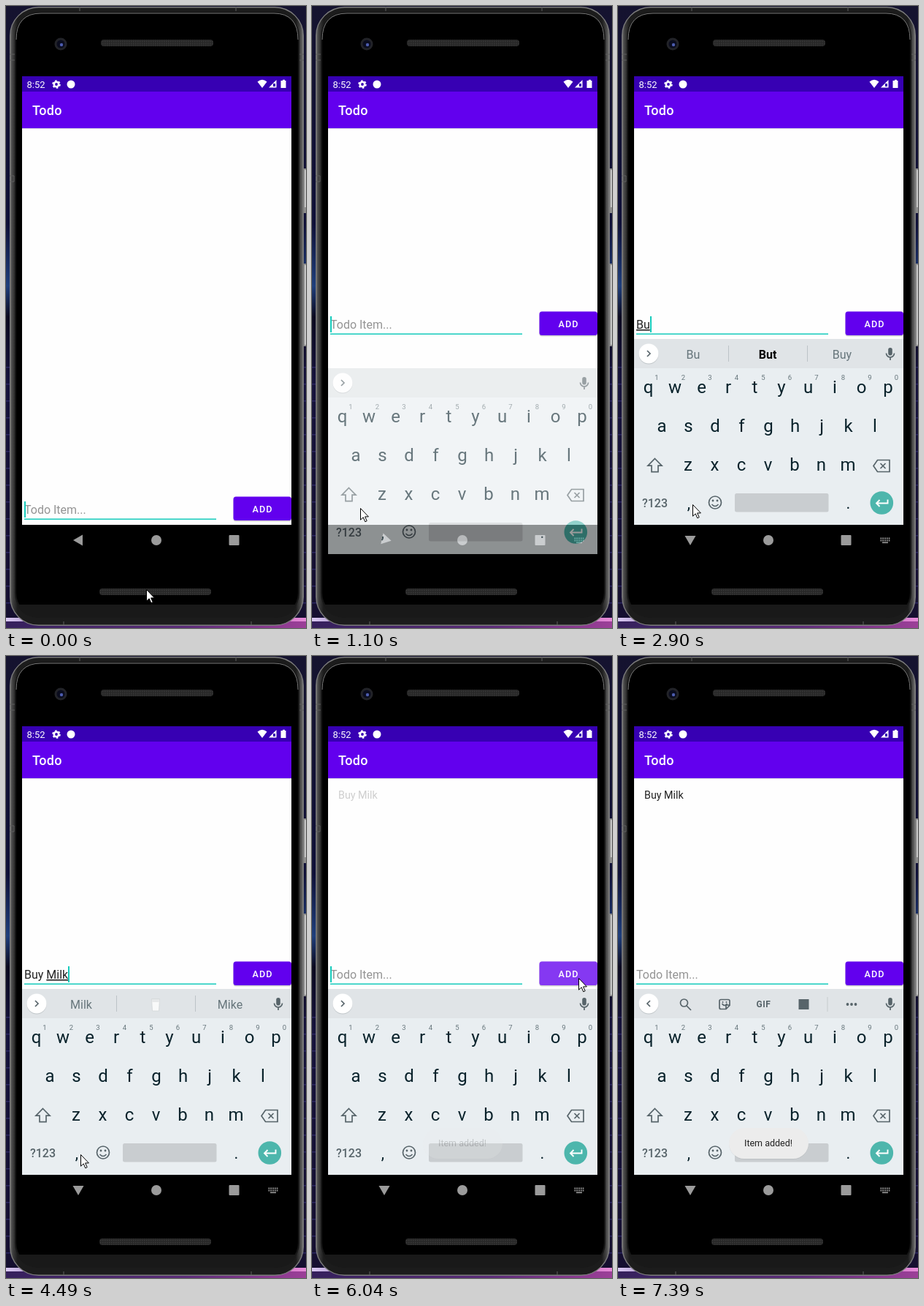
These frames come from a looping animation (411 by 850 pixels, 7510 ms). An HTML page:

```html
<!DOCTYPE html>
<html lang="en">
<head>
<meta charset="utf-8">
<title>Todo app</title>
<style>
html, body { margin: 0; width: 100%; height: 100%; overflow: hidden; background: #0d0c25; }
svg { display: block; width: 411px; height: 850px; font-family: Roboto, sans-serif; }
text { white-space: pre; }
.mid { text-anchor: middle; }
.line { fill: none; stroke: #57646a; stroke-width: 1.7; }
</style>
</head>
<body>
<svg viewBox="0 0 411 850">
<defs>
  <linearGradient id="sky" x2="0" y2="1">
    <stop stop-color="#15132f"/><stop offset=".35" stop-color="#0f1038"/>
    <stop offset=".45" stop-color="#1f3f7c"/><stop offset=".5" stop-color="#0b091f"/>
    <stop offset=".6" stop-color="#16133c"/><stop offset=".97" stop-color="#150f30"/>
  </linearGradient>
  <linearGradient id="horizon">
    <stop stop-color="#d9c8f2"/><stop offset=".3" stop-color="#4b2a78"/>
    <stop offset=".65" stop-color="#a2459f"/><stop offset="1" stop-color="#e58ad8"/>
  </linearGradient>
  <linearGradient id="floor">
    <stop stop-color="#35205c"/><stop offset=".6" stop-color="#5b2b78"/><stop offset="1" stop-color="#9c4098"/>
  </linearGradient>
  <linearGradient id="rim">
    <stop stop-color="#686868"/><stop offset=".01" stop-color="#3c3c3c"/>
    <stop offset=".025" stop-color="#1c1c1c"/><stop offset=".975" stop-color="#1c1c1c"/>
    <stop offset=".99" stop-color="#464646"/><stop offset="1" stop-color="#787878"/>
  </linearGradient>
  <pattern id="grid" width="411" height="23" patternUnits="userSpaceOnUse">
    <path fill="#2c2762" d="M0 10h411v1.500H0z"/>
  </pattern>
  <pattern id="mesh" width="3" height="3" patternUnits="userSpaceOnUse">
    <path fill="#272727" d="M0 0h3v3H0z"/><path fill="#3a3a3a" d="M0 0h1.500v1.500H0z"/>
  </pattern>
  <clipPath id="display"><path d="M22 96h369v653H22z"/></clipPath>
  <clipPath id="buttonShape"><rect x="311.500" y="670.500" width="79.500" height="32.500" rx="3.500"/></clipPath>
</defs>

<!-- Desktop and phone body -->
<path fill="url(#sky)" d="M0 0h411v850H0z"/>
<path fill="url(#grid)" d="M0 483h411v345H0z"/>
<path fill="url(#horizon)" d="M0 836h411v5H0z"/>
<path fill="url(#floor)" d="M0 841h411v9H0z"/>
<path fill="#8d8d8d" d="M404 222h7v61h-7zM404 352h7v113h-7z"/>
<path fill="#c4c4c4" d="M409 224h2v51h-2zM409 354h2v109h-2z"/>
<rect x="5.700" y="1.700" width="401.600" height="844.600" rx="39" fill="url(#rim)" stroke="#7c7c7c" stroke-width="1.400"/>
<path fill="none" stroke="#5e5e5e" d="M315 1v6M101 1v6M5 66h9M5 74h9M5 232h6v8H5M400 66h8M400 74h8M336 841v5M79 841v5"/>
<rect x="13" y="9" width="388" height="826" rx="33" fill="#000" stroke="#161616" stroke-width="2"/>
<path fill="none" stroke="#777" d="M14 46Q14 10 48 10H367Q400 10 400 46"/>
<path fill="#191919" d="M16 818H398Q392 836 366 836H48Q22 836 16 818z"/>
<rect x="130" y="46" width="154" height="9" rx="4" fill="url(#mesh)"/>
<rect x="128" y="796" width="153" height="9" rx="4" fill="url(#mesh)"/>
<circle cx="75" cy="52" r="8.500" fill="#222328"/>
<circle cx="75" cy="52" r="5.500" fill="#0a0c1e"/>
<circle cx="76" cy="53" r="2.200" fill="#4c5cae"/>

<!-- App -->
<path fill="#fefefe" d="M22 96h369v613H22z"/>
<path fill="#d8d4e0" d="M22 167h369v1H22z"/>
<path fill="#6200ee" d="M22 117h369v50H22z"/>
<path fill="#3700b3" d="M22 96h369v21H22z"/>
<g fill="#fff">
  <text x="28.500" y="111.500" font-size="13">8:52</text>
  <text x="36" y="149" font-size="18" font-weight="500" letter-spacing=".22">Todo</text>
  <circle cx="69" cy="107" r="3.200" fill="none" stroke="#fff" stroke-width="2.600"/>
  <circle cx="69" cy="107" r="5" fill="none" stroke="#fff" stroke-width="1.600" stroke-dasharray="2.600 2.636"/>
  <circle cx="89" cy="107" r="5.500"/>
  <path d="M344.500 103.500Q351 98 357.500 103.500L351 112z"/>
  <path d="M360 111.500L370.500 101V111.500zM376.500 102H379V100.800H382V102H383.500V112H376.500z"/>
</g>
<path fill="#3700b3" d="M366 106h3v4h-3z"/>
<text id="item" x="36" y="194.500" font-size="14.300" fill="#222">Buy Milk</text>
<g id="form">
  <text id="hint" x="25" y="694" font-size="16" fill="#949494">Todo Item...</text>
  <text id="typed" x="25" y="694" font-size="16" fill="#222"><tspan id="done"></tspan><tspan id="word" text-decoration="underline"></tspan></text>
  <path fill="#16cbbc" d="M25 700.500h263v1.600H25z"/>
  <path id="caret" fill="#16cbbc" d="M25 677h2v22h-2z"/>
  <rect x="311.500" y="672.500" width="79.500" height="32" rx="3.500" fill="#000" opacity=".18"/>
  <rect x="311.500" y="670.500" width="79.500" height="32.500" rx="3.500" fill="#6200ee"/>
  <g clip-path="url(#buttonShape)"><circle id="ripple" cx="366" cy="693" fill="#fff"/></g>
  <text class="mid" x="351.600" y="692" font-size="12.600" font-weight="500" letter-spacing="1.120" fill="#fff">ADD</text>
</g>

<!-- Navigation bar -->
<path d="M22 709h369v41H22z"/>
<g fill="#9b9b9b">
  <path id="back" d="M92 730L105 722.500V737.500z"/>
  <circle cx="206" cy="730" r="7"/>
  <rect x="305.500" y="723" width="14" height="14" rx="1"/>
  <g id="switcher">
    <path fill="none" stroke="#9b9b9b" stroke-width="2" stroke-dasharray="1.700 1.100" d="M359.500 727.500h14M359.500 730.500h14"/>
    <path d="M362 732.500h8v1.600h-8z"/>
  </g>
</g>

<g clip-path="url(#display)">
<g id="keyboard">
  <path fill="#e9eef1" d="M22 455h369v254H22z"/>
  <path fill="#e0e4e7" d="M22 455h369v40H22z"/>
  <circle cx="42" cy="476" r="13.500" fill="#bfc5c8"/>
  <circle cx="42" cy="475" r="13.500" fill="#fff"/>
  <path id="chevron" class="line" d="M40 471l4 4-4 4"/>
  <g fill="#57646a">
    <rect x="370.200" y="467" width="5.600" height="10.500" rx="2.800"/>
    <path class="line" d="M367.500 474.500a5.500 5.500 0 0 0 11 0M373 480v4"/>
  </g>
  <g id="tools" fill="#57646a">
    <circle class="line" cx="90.500" cy="474" r="5"/>
    <path class="line" d="M94 478l6 6"/>
    <path class="line" d="M141 469.500h10q2 0 2 2v6l-5 5h-7q-2 0-2-2v-9q0-2 2-2zM153 477h-5v5M142.500 475q3.500 5 7 0"/>
    <circle cx="143.500" cy="473" r="1"/><circle cx="148.500" cy="473" r="1"/>
    <text class="mid" x="199.500" y="480" font-size="12" font-weight="700" letter-spacing=".6">GIF</text>
    <rect x="247.500" y="469" width="14" height="14"/>
    <path fill="#c6cbce" d="M286.500 466h1v20h-1z"/>
    <circle cx="314.500" cy="476" r="1.900"/><circle cx="320" cy="476" r="1.900"/><circle cx="325.500" cy="476" r="1.900"/>
  </g>
  <g id="words" font-size="16" fill="#66757b">
    <path fill="#bcc3c7" d="M151 464h1v22h-1zM259 464h1v22h-1z"/>
    <text class="mid word" x="103" y="481.500"></text>
    <text class="mid word" x="205" y="481.500" font-weight="700" fill="#000"></text>
    <text class="mid word" x="307" y="481.500"></text>
    <g id="glass">
      <path fill="#f8f9f9" stroke="#cfd3d5" stroke-width=".7" d="M199.500 468.500h11l-1 16.500h-9z"/>
      <path fill="#e6e8e9" d="M200 469h10l-.3 4h-9.400z"/>
    </g>
  </g>
  <g id="keys" fill="#09222b"></g>
  <path class="line" d="M50.500 618.500l9.500 9.700h-5v8.500h-9v-8.500h-5z"/>
  <path class="line" d="M350 628.500l5.500-8h16.500v16h-16.500zM359.500 625l7 7M366.500 625l-7 7"/>
  <text class="mid" x="50.500" y="684.500" font-size="16" font-weight="500" fill="#57646a">?123</text>
  <circle class="line" cx="133" cy="678.500" r="8.500"/>
  <path class="line" d="M128.500 681q4.500 5 9 0"/>
  <circle cx="130" cy="676" r="1.400" fill="#57646a"/><circle cx="136" cy="676" r="1.400" fill="#57646a"/>
  <rect x="160" y="666" width="128.500" height="25.500" rx="2.500" fill="#c9cdd0"/>
  <circle cx="361.300" cy="679" r="15.800" fill="#4db6ac"/>
  <path fill="none" stroke="#fff" stroke-width="1.900" d="M369.500 674.500v5h-15M358.500 675l-4.500 4.500 4.500 4.500"/>
</g>
</g>

<g id="toast">
  <rect x="152" y="646" width="109" height="42" rx="21" fill="#000" opacity=".06"/>
  <rect x="152" y="645" width="109" height="42" rx="21" fill="#ececec"/>
  <text class="mid" x="206" y="670" font-size="12.500" fill="#222">Item added!</text>
</g>
<path id="pointer" fill="#fff" stroke="#000" d="M.5.5V16.200L4.200 12.800 6.800 18.800 9.200 17.700 6.600 11.900H11.400z"/>
</svg>

<script>
const LOOP = 7510, FORM_LIFT = 253, CLEARED = 5980;
const $ = id => document.getElementById(id);
const ramp = (t, from, to) => Math.min(1, Math.max(0, (t - from) / (to - from)));
const smooth = p => p * p * (3 - 2 * p);
const easeOut = p => 1 - (1 - p) ** 2;
const latest = (list, t) => list.findLast(entry => entry[0] <= t);
const show = (id, alpha) => $(id).setAttribute('opacity', alpha);

// time, committed text, word being composed
const typing = [
  [0, '', ''], [2330, '', 'B'], [2900, '', 'Bu'], [2960, '', 'Buy'], [3210, 'Buy ', ''],
  [3680, 'Buy ', 'M'], [4070, 'Buy ', 'Mi'], [4310, 'Buy ', 'Mil'], [4490, 'Buy ', 'Milk'], [CLEARED, '', '']
];
const suggestions = [
  [0], [2390, 'B', 'But', 'By'], [2900, 'Bu', 'But', 'Buy'], [2960, 'Buy', 'Buys', 'Buying'],
  [3210, 'a', 'the', 'it'], [3740, 'M', 'Me', 'My'], [4070, 'Mi', 'Milk', 'Miles'],
  [4310, 'Mil', 'Milk', 'Miles'], [4490, 'Milk', '', 'Mike'], [CLEARED]
];
const caretOff = [[360, 860], [1770, 2330], [4960, 5460], [6480, 6980], [7390, LOOP]];
// time, x, y
const pointerPath = [
  [90, 192, 797], [680, 66, 686], [1160, 66, 686], [1220, 67, 686], [1340, 102, 681], [5090, 102, 681],
  [5380, 395, 475], [5500, 365, 440], [6470, 365, 440], [6540, 356, 455],
  [6800, 328, 545], [7200, 262, 832], [7260, 258, 856]
];

function addKey(char, x, y, size = 24, fill = '') {
  const key = document.createElementNS('http://www.w3.org/2000/svg', 'text');
  key.textContent = char;
  const attributes = { x, y, 'font-size': size, class: 'mid' };
  if (fill) attributes.fill = fill;
  for (const name in attributes) key.setAttribute(name, attributes[name]);
  $('keys').append(key);
}
[['qwertyuiop', 41.5, 529], ['asdfghjkl', 60, 582], ['zxcvbnm', 96, 635]].forEach(([row, x, y]) =>
  [...row].forEach((char, i) => addKey(char, x + i * 36.5, y)));
[...'1234567890'].forEach((digit, i) => addKey(digit, 53 + i * 36.5, 511, 9.5, '#66757b'));
addKey(',', 97, 687, 22);
addKey('.', 315.5, 687, 22);

function pointerAt(t) {
  const next = pointerPath.findIndex(point => point[0] > t);
  if (next === 0) return pointerPath[0].slice(1);
  if (next < 0) return pointerPath.at(-1).slice(1);
  const [t0, x0, y0] = pointerPath[next - 1], [t1, x1, y1] = pointerPath[next];
  const linear = ramp(t, t0, t1), p = t0 >= 6470 ? linear : smooth(linear);
  return [x0 + (x1 - x0) * p, y0 + (y1 - y0) * p].map(Math.round);
}

function drawForm(t) {
  const [, done, word] = latest(typing, t);
  $('form').setAttribute('transform', `translate(0 ${t < 1040 ? 0 : -FORM_LIFT})`);
  $('done').textContent = done;
  $('word').textContent = word;
  show('hint', done + word ? 0 : 1);
  const width = done + word ? $('typed').getComputedTextLength() : 0;
  $('caret').setAttribute('transform', `translate(${Math.round(width)} 0)`);
  show('caret', caretOff.some(([from, to]) => t >= from && t < to) ? 0 : 1);
  $('ripple').setAttribute('r', 75 * easeOut(ramp(t, 5790, 6000)));
  show('ripple', 0.22 * ramp(t, 5790, 5860) * (1 - ramp(t, 6040, 6380)));
}

function drawKeyboard(t) {
  const drop = t < 1100 ? 61 - 20 * ramp(t, 1040, 1100) : 41 * (1 - ramp(t, 1100, 1245)) ** 2;
  $('keyboard').setAttribute('transform', `translate(0 ${Math.round(drop)})`);
  show('keyboard', ramp(t, 1010, 1160));
  $('back').setAttribute('transform', `rotate(${-90 * smooth(ramp(t, 1000, 1195))} 99 730)`);
  show('switcher', t < 1040 ? 0 : 1);

  const [, ...words] = latest(suggestions, t);
  const tools = words.length ? 0 : t < CLEARED ? ramp(t, 1140, 1200) : ramp(t, 6080, 6200);
  show('tools', tools);
  show('words', words.length ? 1 : 0);
  show('glass', words[1] === '' ? 1 : 0);
  document.querySelectorAll('.word').forEach((label, i) => label.textContent = words[i] || '');
  $('chevron').setAttribute('transform', tools > 0.5 ? 'rotate(180 42 475)' : '');
}

function frame(now) {
  const t = now % LOOP;
  drawForm(t);
  drawKeyboard(t);
  show('item', ramp(t, 6015, 6135));
  show('toast', easeOut(ramp(t, 5990, 6490)));
  $('pointer').setAttribute('transform', `translate(${pointerAt(t)})`);
  requestAnimationFrame(frame);
}
requestAnimationFrame(frame);
</script>
</body>
</html>
```
